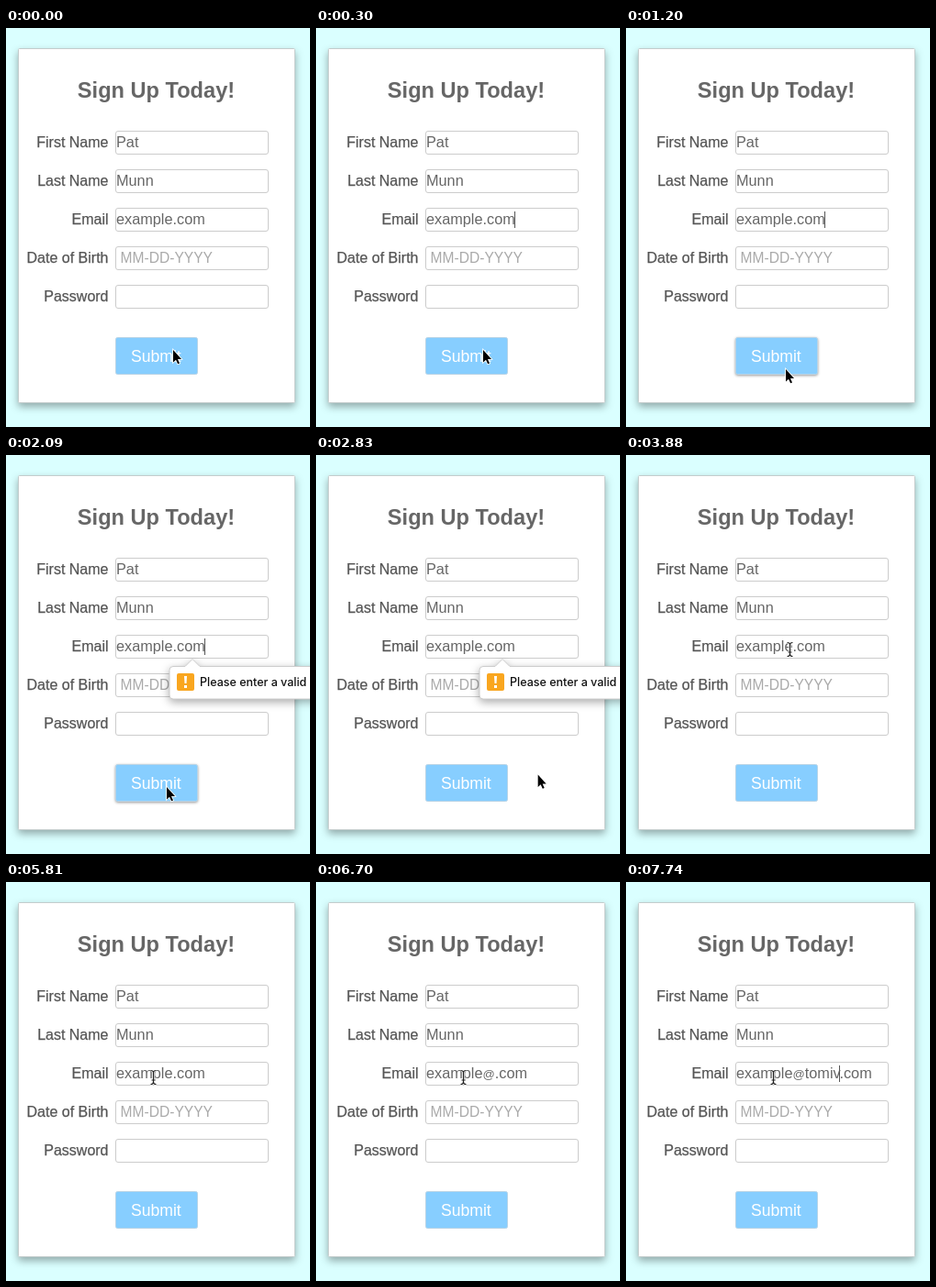
An HTML page that plays this animation: 331 px wide and 435 px high, repeating every 8000 ms.

```html
<!DOCTYPE html>
<html lang="en">
<head>
<meta charset="utf-8">
<title>Sign up form</title>
<style>
html, body { margin: 0; width: 100%; height: 100%; overflow: hidden; background: #daffff; }
svg { display: block; font: 16px "Liberation Sans", Arial, sans-serif; fill: #666; }
.card { fill: #fff; stroke: #c3cccc; filter: drop-shadow(0 4px 4px #0005); }
.title { font-size: 23.6px; font-weight: bold; }
.label { text-anchor: end; fill: #555; stroke: #555; stroke-width: .25; }
.box { fill: #fff; stroke: #ccc; }
.value { font-size: 16.3px; }
.hint { font-size: 15.6px; fill: #aaa; }
.at { font-size: 13px; }
.button { fill: #87ceff; stroke: #b9d4e6; }
.hover { filter: drop-shadow(0 1px 1.5px #0006); }
.bubble { fill: #fff; stroke: #ccc; filter: drop-shadow(0 3px 5px #0005); }
.tip { font: 500 12.5px Inter, "Liberation Sans", sans-serif; fill: #111; }
</style>
</head>
<body>
<svg width="331" height="435" viewBox="0 0 331 435">
  <defs>
    <path id="ibeam" d="M-3-7.5Q0-7.5 0-5V5Q0 7.5-3 7.5M3-7.5Q0-7.5 0-5M0 5Q0 7.5 3 7.5M-2 3H2"/>
  </defs>
  <rect class="card" x="13.5" y="22.5" width="301" height="386" rx="1"/>
  <text class="title" x="163.5" y="76" text-anchor="middle">Sign Up Today!</text>
  <g id="rows"></g>
  <text class="value" id="email" x="120" y="214">example<tspan class="at" id="at"></tspan><tspan id="host"></tspan>.com</text>
  <path id="caret" d="M.5 200v18" stroke="#555"/>
  <rect class="button" id="button" x="119.5" y="337.5" width="89" height="40" rx="2"/>
  <text x="136" y="364" font-size="17.6" fill="#fff">Submit</text>
  <g id="bubble">
    <path class="bubble" d="M340 230.5H211L203 222.5 195 230.5H182q-4 0-4 4V262q0 4 4 4H340z"/>
    <rect x="186" y="238" width="19" height="19" rx="2" fill="#f9a61f"/>
    <path d="M194 241h3l-.5 8h-2zM194 251h3v3h-3z" fill="#fff"/>
    <text class="tip" x="211" y="252">Please enter a valid email address.</text>
  </g>
  <path id="arrow" d="M1 1V14.500L4 11.700 6.100 16.300 8 15.500 6 11H10z" fill="#000" stroke="#fff" stroke-width="1.6" paint-order="stroke"/>
  <g id="beam" fill="none">
    <use href="#ibeam" stroke="#fff" stroke-width="2.4"/>
    <use href="#ibeam" stroke="#222" stroke-width="1.2"/>
  </g>
</svg>
<script>
const LOOP = 8000, STEP = 148.8;   // the screen refreshes once per STEP ms
const BLINK = 3;                   // steps the caret stays on or off
const SUBMIT = 14, BLUR = 20, EDIT = 36, AT = 42, HOST = 48;
const domain = "tomiv";
const $ = id => document.getElementById(id);

const fields = [["First Name", "Pat"], ["Last Name", "Munn"], ["Email", ""],
  ["Date of Birth", "MM-DD-YYYY", "hint"], ["Password", ""]];
$("rows").innerHTML = fields.map(([label, text, kind = "value"], i) => {
  const y = 112 + 42 * i;
  return `<text class="label" x="111.5" y="${y + 18}">${label}</text>
    <rect class="box" x="119.5" y="${y + .5}" width="166" height="25" rx="2.5"/>
    <text class="${kind}" x="${kind === "hint" ? 124.5 : 120}" y="${y + 18}">${text}</text>`;
}).join("");

// Pointer glides: each ends at a step, after a number of steps, at a place.
const glides = [
  { end: 8, steps: 1, x: 173, y: 371 },   // onto the button
  { end: 11, steps: 3, x: 174, y: 361 },
  { end: 20, steps: 4, x: 253, y: 345 },  // away, to click on the card
  { end: 24, steps: 3, x: 177, y: 204 },  // up to the email field
  { end: 26, steps: 2, x: 178, y: 212 },
  { end: 33, steps: 2, x: 181, y: 212 },
  { end: 39, steps: 2, x: 160, y: 213 }
];

const clamp = (v, lo, hi) => Math.min(hi, Math.max(lo, v));
const ease = p => p * p * (3 - 2 * p);

function pointerAt(step) {
  return glides.reduce((from, { end, steps, x, y }) => {
    const p = ease(clamp(1 - (end - step) / steps, 0, 1));
    return { x: from.x + (x - from.x) * p, y: from.y + (y - from.y) * p };
  }, { x: 181, y: 350 });
}

const show = (id, on) => $(id).setAttribute("visibility", on ? "visible" : "hidden");
const move = (id, x, y) => $(id).setAttribute("transform", `translate(${x} ${y})`);
const blink = since => Math.floor((step - since) / BLINK) % 2 === 0;

let step;
function draw(t) {
  step = Math.floor(t / STEP);

  const { x, y } = pointerAt(step);
  const beam = step >= 24;
  move("arrow", x, y);
  move("beam", x + .5, y);
  show("arrow", !beam);
  show("beam", beam);
  $("button").classList.toggle("hover", step >= 8 && x < 209 && y > 337);
  show("bubble", step >= SUBMIT && step < BLUR);

  const letters = Math.floor(clamp((step - HOST) * 1.25, 0, domain.length));
  const typed = step < AT ? "" : "@" + domain.slice(0, letters);
  $("at").textContent = typed.slice(0, 1);
  $("host").textContent = typed.slice(1);

  const email = $("email");
  const last = step < BLUR ? email.getNumberOfChars() - 1 : "example".length + typed.length - 1;
  move("caret", Math.floor(email.getEndPositionOfChar(last).x), 0);
  show("caret", step < BLUR ? step >= 2 && blink(2) : step >= EDIT && (letters > 0 || blink(EDIT)));
}

const begin = performance.now();
function tick() {
  draw((performance.now() - begin) % LOOP);
  requestAnimationFrame(tick);
}
tick();
</script>
</body>
</html>
```
